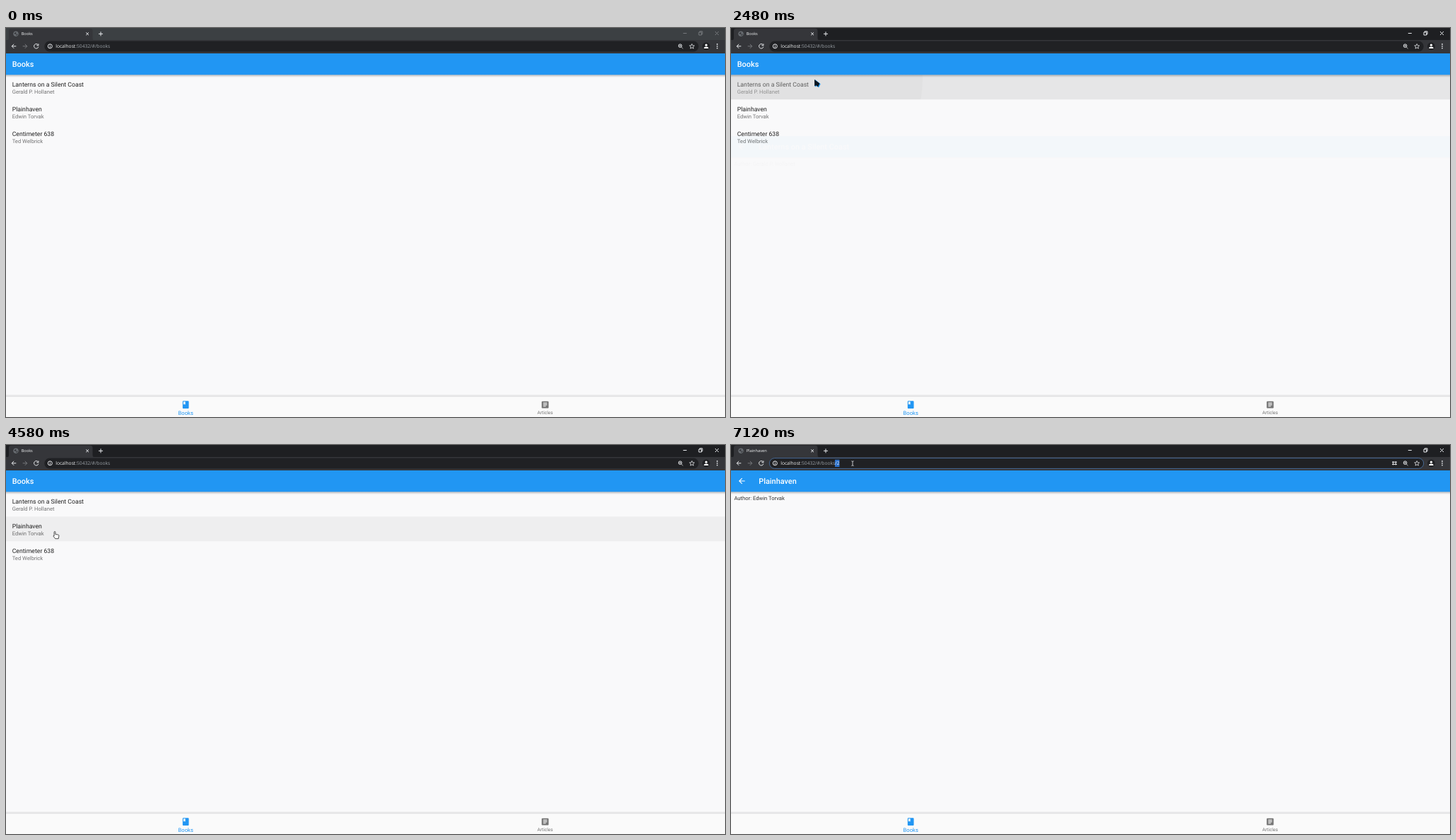
Recreate the animation shown at these times as an HTML page. Size 1017 by 551 pixels, loop 8 s.

```html
<!DOCTYPE html>
<html lang="en">
<head>
<meta charset="utf-8">
<title>Books</title>
<style>
html, body { margin: 0; width: 100%; height: 100%; overflow: hidden; background: #f9f9fa; }
svg { display: block; width: 100vw; height: 100vh; }
text { font-family: Roboto, sans-serif; text-rendering: geometricPrecision; white-space: pre; }
.ui { font-family: "Open Sans", "Noto Sans", sans-serif; }
.bar { font-size: 10.9px; font-weight: 500; fill: #fff; }
.head { font-size: 8.7px; fill: #000; fill-opacity: .87; }
.sub { font-size: 7.63px; fill: #000; fill-opacity: .54; }
.body { font-size: 7.63px; fill: #000; fill-opacity: .8; }
.line { fill: none; stroke: #e8eaed; stroke-width: 1; }
</style>
</head>
<body>
<svg id="stage" viewBox="0 0 1017 551" preserveAspectRatio="none"></svg>
<script>
const LOOP = 8000;
const BOOKS = [
  { title: 'Lanterns on a Silent Coast', author: 'Gerald P. Hollanet' },
  { title: 'Plainhaven', author: 'Edwin Torvak' },
  { title: 'Centimeter 638', author: 'Ted Welbrick' }
];
const ROW_TOP = 66.3, ROW_H = 35;

// Page transitions: open, back, open
const OPEN1 = 2446, BACK = 3866, OPEN2 = 5001, SLIDE = 300;
const TAPS = [2320, 3740, 4875];
const ACTIVATE = 840, FOCUS = 6200, UNSELECT = 6450, DRAG = 6560;

// Pointer path: time, x, y
const PATH = [
  [20, 520, 553], [740, 340, 332], [840, 340, 332], [1640, 150, 149],
  [1860, 118, 70.5], [2020, 118, 70.5], [2090, 118.5, 75], [2160, 118, 73],
  [2760, 118, 73], [2980, 106.5, 77], [3120, 85, 69.5], [3600, 17.5, 48],
  [4180, 17.5, 48], [4520, 70, 121], [4580, 69, 122.5], [5380, 69, 122.5],
  [6000, 152, 27], [6180, 147, 26], [6500, 147, 26], [6700, 161, 26],
  [6900, 161, 26], [7120, 172, 26], [8000, 172, 26]
];

const icon = (d, x, y, fill, s = .545) =>
  `<path d="${d}" fill="${fill}" transform="translate(${x - 12 * s} ${y - 12 * s}) scale(${s})"/>`;
const text = (cls, x, y, s, more = '') => `<text class="${cls}" x="${x}" y="${y}" ${more}>${s}</text>`;
const line = (d, more = '') => `<path class="line" d="${d}" ${more}/>`;
const rect = (x, y, w, h, fill, more = '') =>
  `<rect x="${x}" y="${y}" width="${w}" height="${h}" fill="${fill}" ${more}/>`;

const appBar = rect(0, 66, 1017, 4, 'url(#drop)') + rect(0, 36, 1017, 30.3, '#2196f3');

const rows = BOOKS.map((b, i) => {
  const y = ROW_TOP + i * ROW_H;
  return rect(0, y, 1017, ROW_H, '#000', `id="row${i}" opacity="0"`) +
    text('head', 8.7, y + 16.9, b.title) + text('sub', 8.7, y + 26.4, b.author);
}).join('');

const chrome = `
  ${rect(0, 0, 1017, 18, '#3c4043', 'id="strip"')}
  <path d="M1 17.5Q4 17.5 4 14V4Q4 .8 7.5 .8H119Q122.5 .8 122.5 4V14Q122.5 17.5 126 17.5Z" fill="#35363a"/>
  ${rect(0, 17, 1017, 19, '#35363a')}
  <circle cx="14" cy="8.2" r="3.3" fill="#5f6368" stroke="#80868b" stroke-width=".6"/>
  <path d="M11.5 7.4l2-1.4 1 1.4-1.4 1.4zM14.4 9.6l1.8-1 .2 1.2-1.4 1.2z" fill="#303134"/>
  ${text('ui', 21.7, 10.3, '', 'id="tab" font-size="5.65" fill="#f1f3f4"')}
  ${line('M113.2 6.4l3.8 3.8m0-3.8l-3.8 3.8M131 8.3h6M134 5.3v6')}
  <g id="controls" class="line" stroke-width=".9">
    <path d="M957.8 7.5h5M980 6h3.7v4h-3.7zM981.2 6v-1.2h3.8v4h-1.3M1003 5l5 5m0-5l-5 5"/>
  </g>
  ${line('M14.3 25.8H8.2m3-3l-3 3 3 3')}
  ${line('M23.7 25.8h6.1m-3-3l3 3-3 3', 'style="stroke:#77797d"')}
  ${line('M45.4 23.9a3.2 3.2 0 1 0 .5 2.7M45.9 22.4v2.4h-2.5')}
  ${rect(54.3, 18.6, 925.4, 14.8, '#202124', 'id="omni" rx="7.4" stroke-width=".9"')}
  ${line('M62.3 25.3v2.4M62.3 23.6v.9')}
  <circle class="line" cx="62.3" cy="25.8" r="3"/>
  ${rect(147, 20.8, 6.4, 10.2, '#2a6fc9', 'id="pick"')}
  <text class="ui" x="70.2" y="28.2" font-size="6.7" fill="#9aa0a6"><tspan fill="#f1f3f4">localhost</tspan><tspan id="url1"></tspan><tspan id="url2"></tspan></text>
  <g id="keys">${line('M936.6 23.2v5.2M940.2 23.2v5.2M935 24.2h7M935 27.4h7', 'stroke-dasharray="none"')}</g>
  <circle class="line" cx="953.6" cy="25.2" r="2.3"/>
  ${line('M955.3 27l2.2 2.2M952.4 25.2h2.4M953.6 24v2.4', 'style="stroke-width:.8"')}
  ${line('M970.2 22.5l1 2.3 2.5.2-1.9 1.6.6 2.5-2.2-1.3-2.2 1.3.6-2.5-1.9-1.6 2.5-.2z', 'style="stroke-width:.8"')}
  <circle cx="990.4" cy="25.8" r="5.4" fill="#202124"/>
  <circle cx="990.4" cy="24.2" r="1.6" fill="#fff"/>
  <path d="M987.2 28.9q0-2.4 3.2-2.4t3.2 2.4z" fill="#fff"/>
  <g fill="#e8eaed"><circle cx="1006" cy="23" r=".9"/><circle cx="1006" cy="25.8" r=".9"/><circle cx="1006" cy="28.6" r=".9"/></g>`;

const bookIcon = 'M18 2H6c-1.1 0-2 .9-2 2v16c0 1.1.9 2 2 2h12c1.1 0 2-.9 2-2V4c0-1.1-.9-2-2-2zM6 4h5v8l-2.5-1.5L6 12V4z';
const articleIcon = 'M19 3H5c-1.1 0-2 .9-2 2v14c0 1.1.9 2 2 2h14c1.1 0 2-.9 2-2V5c0-1.1-.9-2-2-2zm-5 14H7v-2h7v2zm3-4H7v-2h10v2zm0-4H7V7h10v2z';
const backIcon = 'M20 11H7.83l5.59-5.59L12 4l-8 8 8 8 1.41-1.41L7.83 13H20v-2z';
const arrow = 'M0 0L.2 9.2 2.9 8.3 5 10.4 7.4 5.6Z';

document.getElementById('stage').innerHTML = `
  <defs>
    <linearGradient id="drop" x2="0" y2="1"><stop stop-opacity=".26"/><stop offset="1" stop-opacity="0"/></linearGradient>
    <linearGradient id="rise" x2="0" y2="1"><stop stop-opacity="0"/><stop offset="1" stop-opacity=".13"/></linearGradient>
    <clipPath id="view">${rect(0, 36, 1017, 486.5, '#000')}</clipPath>
    <clipPath id="tile"><rect id="tileBox" width="1017" height="${ROW_H}"/></clipPath>
  </defs>
  ${rect(0, 0, 1017, 551, '#f9f9fa')}
  <g clip-path="url(#view)">
    <g>${rows}
      <g id="ink" clip-path="url(#tile)">${rect(0, 60, 1017, 120, '#bcbcbc', 'opacity=".4"')}<circle id="splash" fill="#c8c8c8" fill-opacity=".4"/></g>
      ${appBar}${text('bar', 8.7, 54.8, 'Books')}
    </g>
    <g id="detail">
      ${rect(0, 36, 1017, 490, '#f9f9fa')}${appBar}
      <circle id="press" cx="15.3" cy="51" r="13"/>
      ${icon(backIcon, 15.3, 51, '#fff')}
      ${text('bar', 39.2, 54.8, '', 'id="title"')}
      ${text('body', 4.4, 77.6, '', 'id="author"')}
    </g>
  </g>
  ${rect(0, 518.5, 1017, 4, 'url(#rise)')}
  ${rect(0, 522.5, 1017, 29, '#fafafa')}
  ${icon(bookIcon, 254.2, 533.6, '#2196f3')}
  ${icon(articleIcon, 762.6, 533.6, '#757575')}
  ${text('', 254.2, 547.7, 'Books', 'font-size="7.63" fill="#2196f3" text-anchor="middle"')}
  ${text('', 762.6, 547.3, 'Articles', 'font-size="6.54" fill="#757575" text-anchor="middle"')}
  ${chrome}
  <g id="pointer">
    <g id="arrow"><path d="${arrow}" fill="#1e9bf5" stroke="#1e9bf5" stroke-width=".7" transform="translate(.9 .6)"/><path d="${arrow}" fill="#0c1620"/></g>
    <path id="hand" d="M-.9 6.3V.9Q-.8 0 0 0T.9 .9V4L4.8 4.6Q6 4.9 5.9 6.2L5.2 10.2H.7L-2 6.7Q-2.2 5.5-.9 6.3Z" fill="#fff" stroke="#222" stroke-width=".8"/>
    <path id="beam" class="line" d="M-1.6 -3.2Q0 -3.2 0 -2.4Q0 -3.2 1.6 -3.2M0 -2.6V2.8M-1.6 3.4Q0 3.4 0 2.6Q0 3.4 1.6 3.4" style="stroke-width:.8"/>
  </g>`;

const el = {};
document.querySelectorAll('[id]').forEach(n => el[n.id] = n);

const clamp = v => Math.max(0, Math.min(1, v));
const show = (n, on) => n.setAttribute('display', on ? 'inline' : 'none');
const put = (n, attrs) => { for (const k in attrs) n.setAttribute(k, attrs[k]); };
const say = (n, s) => { if (n.textContent !== s) n.textContent = s; };

function bezier(x1, y1, x2, y2, x) {
  const at = (a, b, s) => 3 * a * s * (1 - s) ** 2 + 3 * b * s * s * (1 - s) + s ** 3;
  let lo = 0, hi = 1;
  for (let i = 0; i < 24; i++) {
    const mid = (lo + hi) / 2;
    if (at(x1, x2, mid) < x) lo = mid; else hi = mid;
  }
  return at(y1, y2, lo);
}

// Hermite spline that comes to rest where the path holds
function slope(i, c) {
  const a = PATH[i - 1], p = PATH[i], b = PATH[i + 1];
  if (!a || !b || (p[c] - a[c]) * (b[c] - p[c]) <= 0) return 0;
  return (b[c] - a[c]) / (b[0] - a[0]);
}

function pointer(t) {
  let i = 0;
  while (i < PATH.length - 2 && t >= PATH[i + 1][0]) i++;
  const a = PATH[i], b = PATH[i + 1], d = b[0] - a[0], u = clamp((t - a[0]) / d);
  return [1, 2].map(c =>
    a[c] + (b[c] - a[c]) * u * u * (3 - 2 * u) +
    d * u * (1 - u) * (slope(i, c) * (1 - u) - slope(i + 1, c) * u));
}

const listLive = t => t < OPEN1 || (t > BACK + SLIDE && t < OPEN2);

function rowAt(t) {
  if (t < 20 || !listLive(t)) return -1;
  const y = pointer(t)[1];
  const r = Math.floor((y - ROW_TOP) / ROW_H);
  return y >= ROW_TOP && r < BOOKS.length ? r : -1;
}

function openness(t) {
  const ramp = s => clamp((t - s) / SLIDE);
  return ramp(OPEN1) - ramp(BACK) + ramp(OPEN2);
}

function drawPages(t) {
  const k = openness(t), book = BOOKS[t < 4500 ? 0 : 1];
  show(el.detail, k > 0);
  put(el.detail, {
    opacity: bezier(.42, 0, 1, 1, k),
    transform: `translate(0 ${121.5 * (1 - bezier(.4, 0, .2, 1, k))})`
  });
  say(el.title, book.title);
  say(el.author, 'Author: ' + book.author);

  const near = [0, 12, 25, 37, 50].map(d => rowAt(t - d));
  BOOKS.forEach((b, i) => put(el['row' + i], { opacity: .045 * near.filter(r => r === i).length / 5 }));

  const tap = t < 4500 ? TAPS[0] : TAPS[2], row = t < 4500 ? 0 : 1, age = t - tap;
  const inkOn = age >= 0 && age < 420;
  show(el.ink, inkOn);
  if (inkOn) {
    const [x, y] = pointer(tap);
    put(el.tileBox, { y: ROW_TOP + row * ROW_H });
    put(el.splash, { cx: x, cy: y, r: 8 + age * (age < 126 ? .25 : .9) });
    put(el.ink, { opacity: clamp(age / 100) * clamp((420 - age) / 250) * .6 });
  }
  const held = t - TAPS[1];
  put(el.press, {
    'fill-opacity': .04 * clamp((t - 3480) / 50) * (t < 4200),
    stroke: '#fff', 'stroke-width': 0
  });
  if (held >= 0 && held < 500) put(el.press, { fill: '#c8c8c8', 'fill-opacity': .3 * clamp(held / 100) });
  else put(el.press, { fill: '#000' });
}

function drawChrome(t, x, y) {
  const active = t >= ACTIVATE;
  put(el.strip, { fill: active ? '#1e1f22' : '#3c4043' });
  el.controls.style.stroke = active ? '#e8eaed' : '#75787c';

  const tabBook = t >= OPEN2 + 140 ? 1 : t >= OPEN1 + 140 && t < BACK + SLIDE ? 0 : -1;
  say(el.tab, tabBook < 0 ? 'Books' : BOOKS[tabBook].title);
  const tail = t >= OPEN2 + 40 ? '/2' : t >= OPEN1 + 40 && t < BACK + 40 ? '/1' : '';
  say(el.url1, ':50432/#/books');
  say(el.url2, tail);

  const focus = t >= FOCUS, over = y < 34 && y > 18 && t > 5380;
  put(el.omni, { fill: over && !focus ? '#28292c' : '#202124', stroke: focus ? '#4a6f9f' : 'none' });
  show(el.keys, focus);
  const all = focus && t < UNSELECT;
  const drag = clamp((t - DRAG) / 60);
  show(el.pick, all || drag > 0);
  put(el.pick, { x: all ? 70 : 147, width: all ? 83.4 : 6.4 * (drag < .5 ? .6 : 1) });
  put(el.url2, { fill: all || drag > 0 ? '#e8f0fe' : '#9aa0a6' });
  put(el.url1, { fill: all ? '#e8f0fe' : '#9aa0a6' });
}

function render(t) {
  const [x, y] = pointer(t);
  drawPages(t);
  drawChrome(t, x, y);
  const beam = y < 34 && x > 66, hand = !beam && rowAt(t) >= 0;
  show(el.pointer, t >= 20);
  show(el.beam, beam);
  show(el.hand, hand);
  show(el.arrow, !beam && !hand);
  put(el.pointer, { transform: `translate(${x} ${y})` });
}

const start = performance.now();
function tick() {
  render((performance.now() - start) % LOOP);
  requestAnimationFrame(tick);
}
tick();
</script>
</body>
</html>
```
